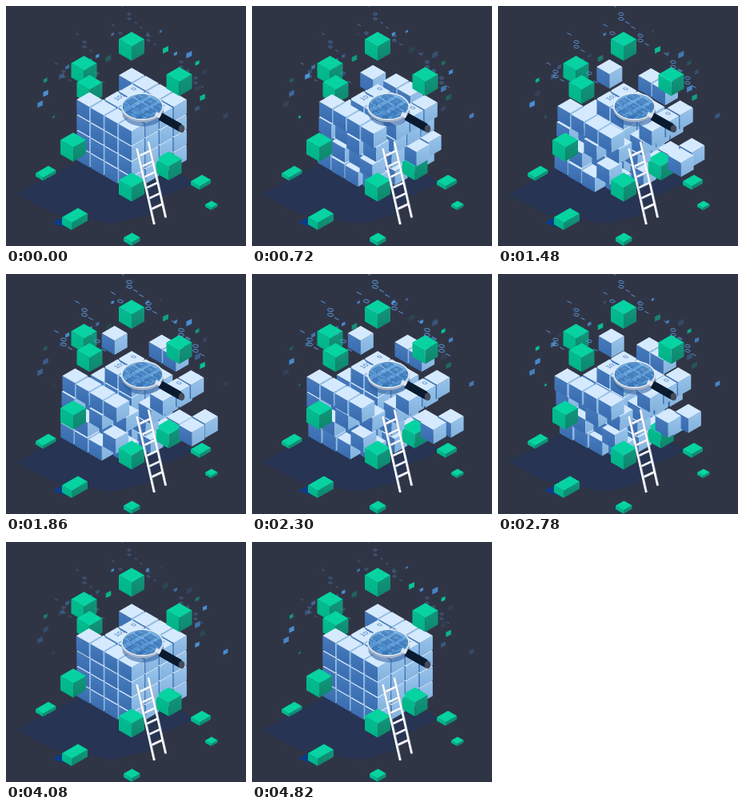
These frames come from a looping animation (300 px wide and 300 px high, 4840 ms). An HTML page with a canvas:

```html
<!DOCTYPE html>
<html lang="en">
<head>
<meta charset="utf-8">
<title>Data cube</title>
<style>
html, body { margin: 0; height: 100%; overflow: hidden; background: #303546; }
canvas { display: block; width: 100vw; height: 100vh; }
</style>
</head>
<body>
<canvas id="stage"></canvas>
<script>
const LOOP = 4840, SIZE = 300, TAU = 2 * Math.PI;
const canvas = document.getElementById('stage');
const ctx = canvas.getContext('2d');
const scale = Math.max(1, window.devicePixelRatio || 1);
canvas.width = canvas.height = SIZE * scale;

const STEP = { x: 17.6, y: 10.2, z: 19.2 };
const BLUE = { top: '#d5eaff', left: ['#487bbd', '#386bae'], right: ['#98c4ec', '#82b1dc'] };
const GREEN = { top: '#06d3a1', left: ['#03bd90', '#02b188'], right: ['#12977c', '#0d866c'] };

const ease = p => (1 - Math.cos(Math.PI * Math.min(1, Math.max(0, p)))) / 2;

// Out to full reach, then back; shift moves the peak
function pulse(t, shift = 0) {
  const peak = 2080 + shift;
  return t < peak ? ease(t / peak) : 1 - ease((t - peak) / 1900);
}

function poly(fill, ...pts) {
  ctx.fillStyle = fill;
  ctx.beginPath();
  pts.forEach(([x, y]) => ctx.lineTo(x, y));
  ctx.closePath();
  ctx.fill();
}

function line(color, width, x1, y1, x2, y2) {
  ctx.strokeStyle = color;
  ctx.lineWidth = width;
  ctx.beginPath();
  ctx.moveTo(x1, y1);
  ctx.lineTo(x2, y2);
  ctx.stroke();
}

function oval(fill, x, y, rx, ry) {
  ctx.fillStyle = fill;
  ctx.beginPath();
  ctx.ellipse(x, y, rx, ry, 0, 0, TAU);
  ctx.fill();
}

function shade([a, b], y1, y2) {
  const g = ctx.createLinearGradient(0, y1, 0, y2);
  g.addColorStop(0, a);
  g.addColorStop(1, b);
  return g;
}

// Isometric box from its left top corner: a runs up right, b down right
function box(paint, x, y, a, b, h) {
  const k = .578;
  const left = [x, y], back = [x + a, y - k * a];
  const front = [x + b, y + k * b], right = [x + a + b, y + k * (b - a)];
  const low = ([px, py]) => [px, py + h];
  poly(shade(paint.left, y, front[1] + h), left, front, low(front), low(left));
  poly(shade(paint.right, right[1], front[1] + h), front, right, low(right), low(front));
  poly(paint.top, left, back, right, front);
}

const cube = (x, y, paint) => box(paint, x - 16, y, 16, 16, 17.8);
const greenCube = (x, y) => cube(x, y, GREEN);

// Text lying on a top face
function decal(text, x, y, size, color) {
  ctx.save();
  ctx.translate(x, y);
  ctx.transform(.866, -.5, .866, .5, 0, 0);
  ctx.font = size + 'px "Liberation Sans", Arial, sans-serif';
  ctx.textAlign = 'center';
  ctx.textBaseline = 'middle';
  ctx.fillStyle = color;
  ctx.fillText(text, 0, 0);
  ctx.restore();
}

// Each outer cube slides away along the normal of its face
function travel(i, j, k) {
  if (j === 0) {
    const loose = k === 0 || (k === 3 && i < 3) || (i + k) % 2;
    return { axis: 'j', dist: loose && i + k < 6 ? -20 : -7, shift: 280 - 60 * i - 150 * k };
  }
  if (i === 3) {
    const dist = k % 2 ? 7 : k && j < 2 ? 0 : 22 + 9 * k;
    return { axis: 'i', dist, shift: -120 * (3 - j) * k };
  }
  if (k === 0 && i === 0) return { axis: 'i', dist: -22, shift: 0 };
  if (k === 0 && j === 3) return { axis: 'j', dist: 20.5, shift: 0 };
  return { axis: 'i', dist: 0, shift: 0 };
}

const DECALS = { '110': '101', '120': '0', '320': '0' };
const cells = [];
for (let n = 0; n < 64; n++) {
  const i = n >> 4, j = n >> 2 & 3, k = n & 3;
  const open = i === 0 && k === 0 && (j === 1 || j === 2);
  if (!open) cells.push({ i, j, k, move: travel(i, j, k), text: DECALS[`${i}${j}${k}`] });
}

function drawCubes(t) {
  const items = cells.map(({ i, j, k, move, text }) => {
    const d = move.dist / STEP.x * pulse(t, move.shift);
    if (move.axis === 'i') i += d; else j += d;
    const x = 104.3 + STEP.x * (i + j);
    const y = 117 + STEP.y * (i - j) + STEP.z * k;
    return {
      depth: i - j - k,
      draw() {
        cube(x, y, BLUE);
        if (text) decal(text, x + 3, y - 3, 8, '#3f73b3');
      }
    };
  });
  items.push({ depth: -.6, draw: () => greenCube(203.5, 191) });
  items.sort((a, b) => a.depth - b.depth).forEach(item => item.draw());
}

function drawGround() {
  poly('#273453', [13, 235], [72, 203], [104, 188], [214, 208], [236, 221],
    [194, 239], [178, 261], [134, 272], [60, 260]);
  poly('#0c3c86', [58, 271], [72, 263], [84, 270], [82, 279]);
  box(GREEN, 37, 209, 16, 9.5, 4);
  box(GREEN, 70, 264, 20, 12, 9);
  box(GREEN, 231, 219, 14, 11, 4.5);
  box(GREEN, 249, 248, 8, 7.5, 3);
  poly('#0c3c86', [145, 293], [151, 290], [157, 299], [153, 298]);
  box(GREEN, 147, 289.5, 10.5, 10, 4.5);
}

function drawLadder() {
  ctx.lineCap = 'butt';
  for (let n = 0; n < 6; n++) {
    const p = .1 + n * .14;
    const x = 163.5 + 21.5 * p, y = 178 + 95 * p;
    line('#bfc9da', 2, x, y + 1, x + 15, y - 6);
    line('#ffffff', 2, x, y, x + 15, y - 7);
  }
  for (const [x, y] of [[163.5, 178], [177.8, 169.5]]) {
    line('#b4bfd0', 1.6, x + 1.2, y, x + 22.7, y + 95);
    line('#ffffff', 2.2, x, y, x + 21.5, y + 95);
  }
}

function drawLens(t) {
  const x = 170.5, y = 125.5;
  oval('rgba(45,91,155,.55)', x + 1, y + 9, 26, 16);
  oval('#a4b2c6', x, y + 2.5, 26.5, 17);
  oval('#e6ecf2', x, y, 26.5, 17);
  ctx.save();
  ctx.beginPath();
  ctx.ellipse(x, y, 24.8, 15.6, 0, 0, TAU);
  ctx.clip();
  ctx.fillStyle = shade(['#79b3e4', '#4080c1'], y - 15, y + 15);
  ctx.fillRect(x - 27, y - 18, 54, 36);
  for (let n = 0; n < 9; n++) {
    const a = (n % 3 - 1) * 13, b = (Math.floor(n / 3) - 1) * 13;
    box({ top: 'rgba(45,105,172,.5)', left: ['#3975b8', '#3975b8'], right: ['#5b9bd8', '#5b9bd8'] },
      x + .866 * (a + b) - 9, y + .5 * (b - a), 8, 6 + n % 3, 2);
  }
  for (let row = 0; row < 5; row++) {
    for (let n = 0; n < 7; n++) {
      const a = (n - 3) * 6, b = (row - 2) * 7;
      const digit = (n * 5 + row * 3) % 4 < 2 ? '1' : '0';
      const glow = .5 + .3 * Math.sin(TAU * (t / LOOP * 2 + (n * 3 + row * 5) / 11));
      decal(digit, x + .866 * (a + b), y + .5 * (b - a), 6, `rgba(190,225,255,${glow})`);
    }
  }
  ctx.restore();
  ctx.lineCap = 'butt';
  line('#dde5ee', 5, 187, 134.5, 194, 138.5);
  line('#0a1b30', 10, 193, 138, 217, 151.5);
  ctx.lineCap = 'round';
  line('#0a1b30', 9, 198, 141, 218, 152.5);
  oval('#454b5b', 219.5, 153.5, 3.8, 4.8);
}

function random(seed) {
  const v = Math.sin(seed * 127.1) * 43758.5453;
  return v - Math.floor(v);
}

// Chips hang in an arch over the cube
function drawChips(t) {
  const count = 24;
  for (let n = 0; n < count; n++) {
    const angle = Math.PI * (n + .5) / count;
    const far = .68 + .32 * random(n + 1);
    const x = 155 - 122 * far * Math.cos(angle);
    const y = 145 - 122 * far * Math.sin(angle);
    const s = 1.3 + 2.4 * random(n + 40);
    const rgb = n % 3 ? '74,144,214' : '6,196,148';
    const wave = Math.sin(TAU * (t / LOOP * (2 + n % 2) + random(n + 80)));
    poly(`rgba(${rgb},${.55 + .45 * wave})`,
      [x - s, y - s * .45], [x + s, y - s * 1.4], [x + s, y + s * .45], [x - s, y + s * 1.4]);
  }
}

// Each anchor carries two zeros with a one on either side
const ANCHORS = [[154, 10], [98, 45], [237, 90], [114, 84], [178, 37], [72, 82], [219, 70], [143, 34]];

function drawDigits(t) {
  const grow = pulse(t, 100), s = .55 + .4 * grow;
  ctx.save();
  ctx.globalAlpha = .45 + .55 * grow;
  ctx.lineCap = 'butt';
  ANCHORS.forEach(([x, y], n) => {
    for (const dy of n % 4 < 3 ? [0, 6] : [0]) {
      ctx.strokeStyle = '#5c9ee0';
      ctx.lineWidth = 1;
      ctx.beginPath();
      ctx.ellipse(x, y + dy, 3.8 * s, 2 * s, .2, 0, TAU);
      ctx.stroke();
    }
    for (const [dx, dy] of [[-9, -10], [8, 11]]) {
      line('#5c9ee0', 1, x + dx - 3 * s, y + dy - 1.6 * s, x + dx + 3 * s, y + dy + 1.6 * s);
    }
  });
  ctx.restore();
}

function frame(now) {
  const t = now % LOOP;
  ctx.setTransform(scale, 0, 0, scale, 0, 0);
  ctx.fillStyle = '#303546';
  ctx.fillRect(0, 0, SIZE, SIZE);
  drawGround();
  drawChips(t);
  greenCube(97.5, 71.5);
  greenCube(104.5, 95.5);
  greenCube(157, 41.5);
  drawCubes(t);
  greenCube(216.5, 85.5);
  greenCube(84, 167.5);
  greenCube(157, 217.5);
  drawDigits(t);
  drawLadder();
  drawLens(t);
  requestAnimationFrame(frame);
}
requestAnimationFrame(frame);
</script>
</body>
</html>
```
